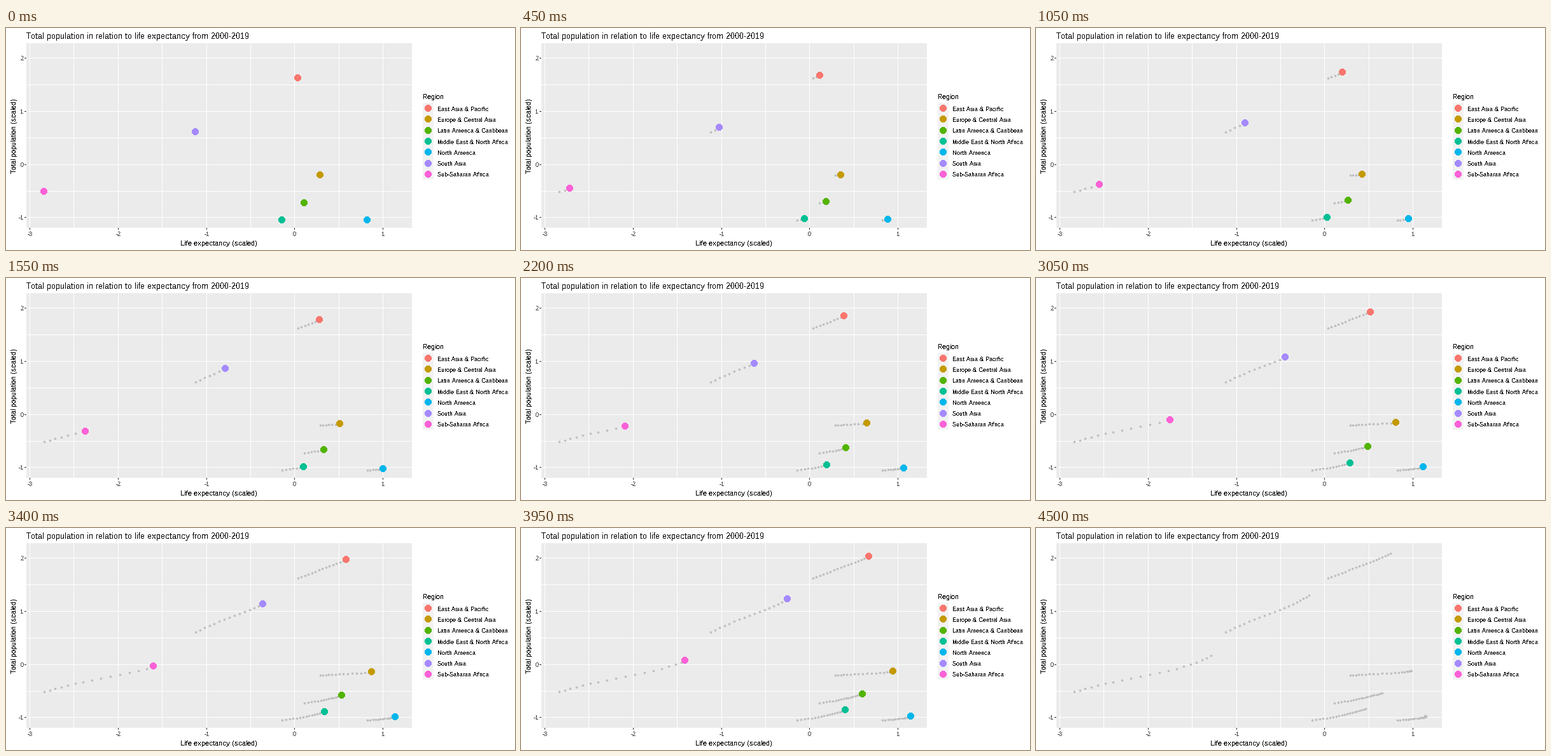
Recreate the animation shown at these times as a matplotlib script. Size 800 px wide and 350 px high, loop 5 s.

```python
import numpy as np
import matplotlib.pyplot as plt
from matplotlib.animation import FuncAnimation
from matplotlib.patches import Rectangle

plt.rcParams.update({
    "font.family": "Liberation Sans",
    "text.hinting": "native",
    "text.hinting_factor": 1,
    "text.kerning_factor": 6,
    "text.antialiased": False,
})

WIDTH, HEIGHT, DPI = 800, 350, 100
FRAMES, INTERVAL, MOVING_FRAMES = 100, 50, 90
LEFT, TOP, RIGHT, BOTTOM = 32, 24, 638, 315
PT = 72 / DPI
BIG, SMALL = 9.8, 3.6

# Each year is reached in 4 tween steps (3 for the last six), then held one frame.
YEARS = 20
STEPS = [4] * 13 + [3] * 6
ARRIVALS = np.cumsum([0] + [n + 1 for n in STEPS]) - 1
CLOCK = np.ravel(np.column_stack([ARRIVALS, ARRIVALS + 1]))
CLOCK_YEARS = np.repeat(np.arange(YEARS), 2)

# name, color, start, end, bend of the path (x, y), swing of the horizontal speed
REGIONS = [
    ("East Asia & Pacific", "#F8766D", (458.5, 78.5), (556.7, 39.7), (3, -0.3), -1),
    ("Europe & Central Asia", "#C49A00", (493.5, 231.7), (589.8, 224.3), (5.5, 0.6), -6),
    ("Latin America & Caribbean", "#53B400", (468.5, 275.5), (543.5, 259.5), (6.2, 0), 1),
    ("Middle East & North Africa", "#00C094", (433.5, 302.5), (517.5, 284.5), (7, 0.6), 0.5),
    ("North America", "#00B6EB", (567.5, 302.5), (610.7, 295.5), (13.5, 0), -1.5),
    ("South Asia", "#A58AFF", (297.5, 163.5), (428.5, 105.4), (7.5, -1.7), -3.5),
    ("Sub-Saharan Africa", "#FB61D7", (59.5, 257.5), (274.5, 200.5), (4, 3), -11),
]
COLORS = [region[1] for region in REGIONS]


def track(start, end, bend, swing):
    """Positions for every year: a line, a parabolic bend and a sine swing in x."""
    u = np.linspace(0, 1, YEARS)[:, None]
    start, end, bend = map(np.array, (start, end, bend))
    wave = swing * np.sin(2 * np.pi * u) * [1, 0]
    return start + (end - start) * u + bend * 4 * u * (1 - u) + wave


def snap(values):
    return np.floor(values) + 0.5


TRACKS = np.array([track(*region[2:]) for region in REGIONS])

fig = plt.figure(figsize=(WIDTH / DPI, HEIGHT / DPI), dpi=DPI, facecolor="white")
ax = fig.add_axes([0, 0, 1, 1])
ax.set(xlim=(0, WIDTH), ylim=(HEIGHT, 0))
ax.axis("off")


def box(x, y, w, h, color):
    ax.add_patch(Rectangle((x, y), w, h, fc=color, lw=0, aa=False, zorder=1))


def label(x, y, text, px, color="black", **kwargs):
    ax.text(x, y, text, fontsize=px * PT, color=color,
            **{"va": "baseline", **kwargs})


def dots(points, diameter, colors, zorder):
    return ax.scatter(*points.T, s=(diameter * PT) ** 2, c=colors, linewidths=0,
                      antialiased=False, snap=False, zorder=zorder)


def draw_panel():
    box(LEFT, TOP, RIGHT - LEFT, BOTTOM - TOP, "#EBEBEB")
    for value in np.arange(-3, 1.1, 0.5):
        x = int(453.75 + 138.75 * value)
        box(x, TOP, 1, BOTTOM - TOP, "white")
        if value == int(value):
            box(x, BOTTOM, 1, 3, "#333333")
            label(x + 0.5, 328, f"{value:.0f}", 9, "#4D4D4D", ha="center")
    for value in np.arange(-1, 2.1, 0.5):
        y = int(215.2 - 83.75 * value)
        box(LEFT, y, RIGHT - LEFT, 1, "white")
        if value == int(value):
            box(LEFT - 3, y, 3, 1, "#333333")
            label(27.5, y + 4, f"{value:.0f}", 9, "#4D4D4D", ha="right")
    label(LEFT, 17, "Total population in relation to life expectancy from 2000-2019", 13)
    label(335, 343, "Life expectancy (scaled)", 11, ha="center")
    label(18, 170, "Total population (scaled)", 11, rotation=90,
          ha="right", va="center")


def draw_legend():
    label(655, 112, "Region", 11)
    box(655, 118, 17, 121, "#F2F2F2")
    rows = 126.6 + 17.28 * np.arange(len(REGIONS))
    for (name, *_), y in zip(REGIONS, rows):
        label(678, round(y + 4.2), name, 9)
    dots(np.column_stack([np.full(len(rows), 663.5), snap(rows)]), BIG, COLORS, 3)


draw_panel()
draw_legend()
trail = dots(TRACKS[:, 0], SMALL, "#BEBEBE", 2)
leaders = dots(TRACKS[:, 0], BIG, COLORS, 4)


def update(frame):
    year = np.interp(frame, CLOCK, CLOCK_YEARS)
    past = int(year + 1e-9)
    following = min(past + 1, YEARS - 1)
    now = TRACKS[:, past] + (year - past) * (TRACKS[:, following] - TRACKS[:, past])
    trail.set_offsets(snap(TRACKS[:, :past + 1].reshape(-1, 2)))
    leaders.set_offsets(snap(now))
    leaders.set_visible(frame < MOVING_FRAMES)
    return trail, leaders


anim = FuncAnimation(fig, update, frames=FRAMES, interval=INTERVAL,
                     init_func=lambda: update(0), repeat=True, repeat_delay=0)
plt.show()
```
